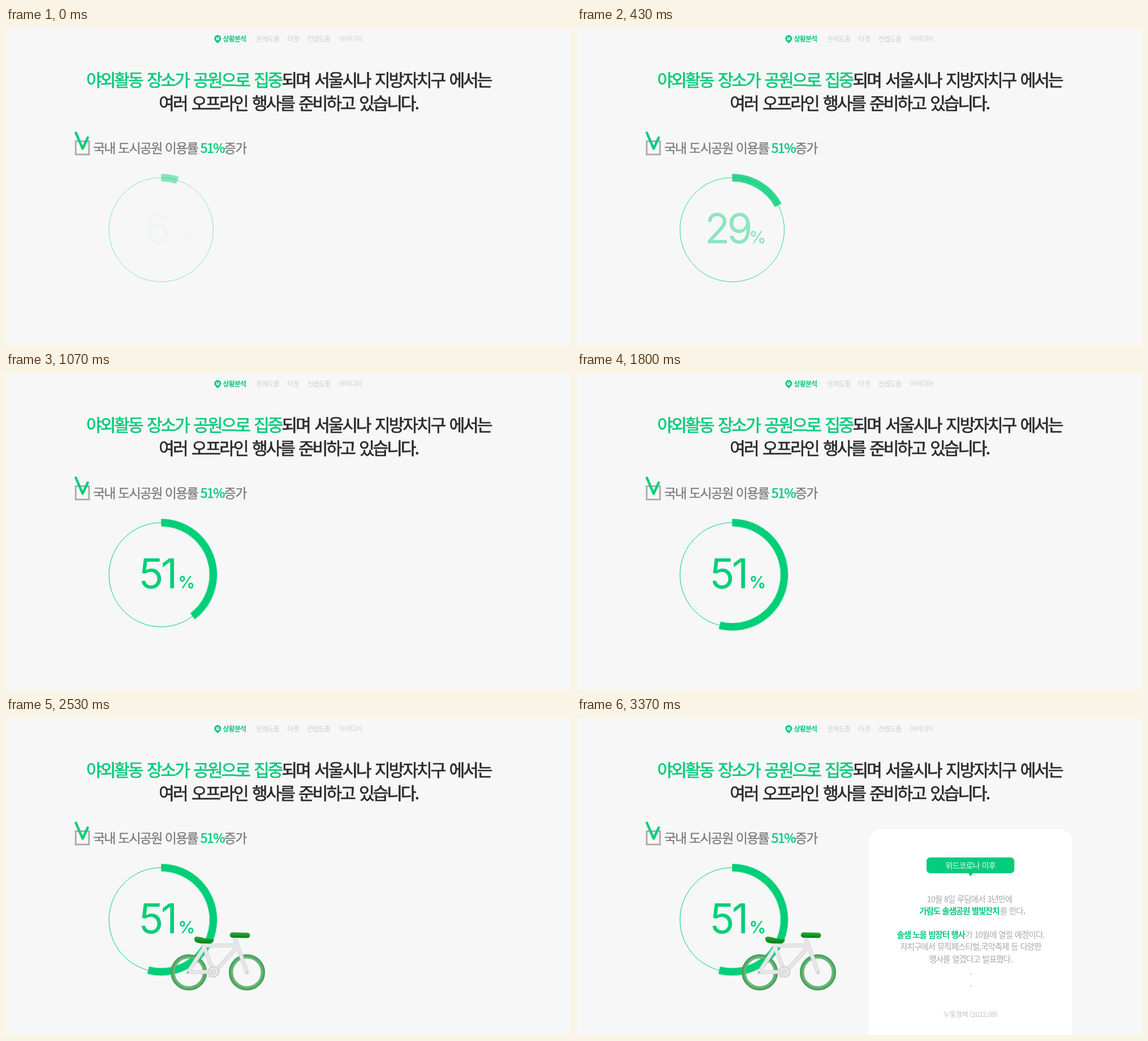
Recreate the animation shown at these times as an HTML page. Size 999 by 561 pixels, loop 3.73 s.

```html
<!DOCTYPE html>
<html lang="ko">
<head>
<meta charset="utf-8">
<title>도시공원 이용률</title>
<style>
  html, body { margin: 0; width: 100%; height: 100%; overflow: hidden; background: #f7f7f7; }
  svg { display: block; width: 999px; height: 561px; }
  text { font-family: "Noto Sans CJK KR", "Noto Sans CJK", "Noto Sans KR", sans-serif; white-space: pre; }
  .green { fill: #06c97b; }
  .nav { font-size: 12px; letter-spacing: -.85px; font-weight: 300; fill: #cfcfcf; }
  .nav .on { font-weight: 700; fill: #06c97b; }
  .head { font-size: 30px; letter-spacing: -2.95px; word-spacing: 2.9px; fill: #2b2b2b; stroke: #2b2b2b; stroke-width: .7px; }
  .head .green { stroke: #06c97b; }
  .sub { font-size: 23px; letter-spacing: -1.8px; word-spacing: .7px; fill: #777; stroke: #777; stroke-width: .25px; }
  .sub .green { letter-spacing: -1.5px; stroke: #06c97b; stroke-width: .6px; }
  .tag { font-size: 14px; letter-spacing: -.85px; word-spacing: 1px; font-weight: 300; fill: #e9faf2; }
  .body { font-size: 14.5px; letter-spacing: -1px; word-spacing: .8px; font-weight: 300; fill: #a9a9a9; }
  .body .green { font-weight: 700; letter-spacing: -1.2px; }
  .cite { font-size: 12.3px; letter-spacing: -.4px; font-weight: 300; fill: #c0c0c0; }
  .mid { text-anchor: middle; }
  .num text { font-family: Inter, "Open Sans", sans-serif; fill: #02cf78; }
  #count { font-size: 73px; font-weight: 400; letter-spacing: -5px; }
  .pct { font-size: 29.5px; font-weight: 600; text-anchor: middle; }

  .ring, .num, .bike, .card { animation: 3730ms linear infinite; }
  .ring { fill: none; stroke: #02cf78; animation-name: ring; }
  .num { animation-name: num; }
  .bike { animation-name: bike; }
  .card { animation-name: card; }
  @keyframes ring { 0% { opacity: .47 } 17.2%, 100% { opacity: 1 } }
  @keyframes num { 0% { opacity: .03 } 28%, 100% { opacity: 1 } }
  @keyframes bike { 0%, 53.2% { opacity: 0 } 68%, 100% { opacity: 1 } }
  @keyframes card { 0%, 76.8% { opacity: 0 } 84.9%, 100% { opacity: 1 } }
</style>
</head>
<body>
<svg viewBox="0 0 999 561">
  <defs>
    <linearGradient id="pad" x2="0" y2="1">
      <stop offset="0" stop-color="#25ad35"/>
      <stop offset="1" stop-color="#067b18"/>
    </linearGradient>
    <g id="wheel" fill="none">
      <circle r="28.3" stroke="#57ab68" stroke-width="7.4"/>
      <circle r="30.8" stroke="#479d5a" stroke-width="1.8"/>
      <circle r="26.3" stroke="#74bb82" stroke-width="1.8"/>
    </g>
    <path id="tubes" d="M322 450L353 402M322 450L367 449M347 397L367 449M353 403L408 402M409 405L371 447M404 388L426 450" fill="none" stroke-linecap="round"/>
  </defs>

  <path fill="#06c97b" d="M374.3 27C371 24 368.2 21.6 368.2 18.7A6.1 6.1 0 0 1 380.4 18.7C380.4 21.6 377.6 24 374.3 27Z"/>
  <circle cx="374.3" cy="18.7" r="3" fill="#f7f7f7"/>
  <circle cx="374.3" cy="18" r="1.2" fill="#06c97b"/>
  <g class="nav">
    <text class="on" x="383.5" y="24.3">상황분석</text>
    <text x="442.5" y="24.3">문제도출</text>
    <text x="497.5" y="24.3">타겟</text>
    <text x="532.5" y="24.3">컨셉도출</text>
    <text x="588.5" y="24.3">아이디어</text>
  </g>

  <g class="head">
    <text x="142" y="102.8"><tspan class="green">야외활동 장소가 공원으로 집중</tspan>되며 서울시나 지방자치구 에서는</text>
    <text x="270.3" y="144.2">여러 오프라인 행사를 준비하고 있습니다.</text>
  </g>

  <rect x="123.2" y="200.3" width="23.6" height="23.6" fill="none" stroke="#a9a9a9" stroke-width="2.8"/>
  <path d="M123.5 185.5L135.5 213.5L144.5 194" fill="none" stroke="#06ce79" stroke-width="4.4" stroke-linecap="round" stroke-linejoin="round"/>
  <g class="sub">
    <text x="154" y="220.6">국내 도시공원 이용률</text>
    <text class="green" x="343.8" y="220.6">51%</text>
    <text x="385.8" y="220.6">증가</text>
  </g>

  <circle class="ring" cx="274.3" cy="357" r="92.2"/>
  <circle class="ring" id="arc" cx="274.3" cy="357" r="92.2" stroke-width="13.4" pathLength="360" stroke-dasharray="18 360" transform="rotate(-90 274.3 357)"/>
  <g class="num">
    <text id="count" y="380.5">6</text>
    <text class="pct" x="319.2" y="380.5">%</text>
  </g>

  <g class="bike">
    <use href="#wheel" x="323.2" y="450.2"/>
    <use href="#wheel" x="426" y="450.2"/>
    <use href="#tubes" stroke="#d3d3d6" stroke-width="7.2"/>
    <use href="#tubes" stroke="#e6e6e8" stroke-width="5.4"/>
    <circle cx="367" cy="449" r="9" fill="#ededee" stroke="#d9d9dc" stroke-width="3.4"/>
    <circle cx="367" cy="449" r="4.2" fill="#e4e4e6" stroke="#c6c6c9"/>
    <path d="M367 449L360 458" stroke="#dededf" stroke-width="4" stroke-linecap="round"/>
    <circle cx="322" cy="450" r="1.6" fill="#96969a"/>
    <circle cx="426" cy="450" r="1.4" fill="#bdbdc0"/>
    <path d="M336 387Q331 388 334 395Q337 399 349 399L361 398.5Q369 396 367 391.5Q354 391 347 388.5Q341 386.5 336 387Z" fill="url(#pad)"/>
    <path d="M399 384.5L407 385" stroke="#dcdcde" stroke-width="8" stroke-linecap="round"/>
    <rect x="396" y="379.6" width="35.5" height="9.4" rx="4.6" fill="url(#pad)" transform="rotate(1.5 414 384)"/>
  </g>

  <g class="card">
    <rect x="515.5" y="197" width="360.5" height="400" rx="22" fill="#fff"/>
    <rect x="618" y="246.8" width="155.3" height="27.9" rx="6.5" fill="#03cc7c"/>
    <path d="M691.5 274L696 280.5L700.5 274Z" fill="#03cc7c"/>
    <text class="tag mid" x="695.7" y="266">위드코로나 이후</text>
    <g class="body">
      <text class="mid" x="694" y="325.5">10월 8일 루담에서 3년만에</text>
      <text class="green" x="605.5" y="346.5">가람도 솔샘공원 별빛잔치</text>
      <text x="747.8" y="346.5">를 한다<tspan font-weight="700">.</tspan></text>
      <text class="green" x="565.5" y="389">솔샘 노을 밤장터 행사</text>
      <text x="686.5" y="389">가 10월에 열릴 예정이다.</text>
      <text class="mid" x="696" y="410.3">자치구에서 뮤직페스티벌,국악축제 등 다양한</text>
      <text class="mid" x="695.7" y="431.5">행사를 열겠다고 발표했다.</text>
      <text class="mid" x="696" y="453.5">.</text>
      <text class="mid" x="696" y="474.5">.</text>
    </g>
    <text class="cite mid" x="695.5" y="528.8">누빛경제 (2022.09)</text>
  </g>
</svg>
<script>
  const LOOP = 3730;
  const arc = document.getElementById('arc');
  const count = document.getElementById('count');
  const pen = document.createElement('canvas').getContext('2d');
  pen.font = '400 73px Inter, "Open Sans", sans-serif';
  pen.letterSpacing = '-5px';
  const unit = v => Math.min(1, Math.max(0, v));

  // Centre the visible shape of the digits, not their advance box
  function setCount(n) {
    const m = pen.measureText(n);
    count.textContent = n;
    count.setAttribute('x', 268.5 + (m.actualBoundingBoxLeft - m.actualBoundingBoxRight) / 2);
  }

  function draw(t) {
    const sweep = (1 - Math.cos(Math.PI * unit((t + 464) / 2338))) / 2;
    arc.setAttribute('stroke-dasharray', 194.4 * sweep + ' 360');
    setCount(Math.round(51 * unit((t + 112) / 953)));
  }

  let start;
  function tick(now) {
    start ??= now;
    draw((now - start) % LOOP);
    requestAnimationFrame(tick);
  }
  draw(0);
  requestAnimationFrame(tick);
</script>
</body>
</html>
```
